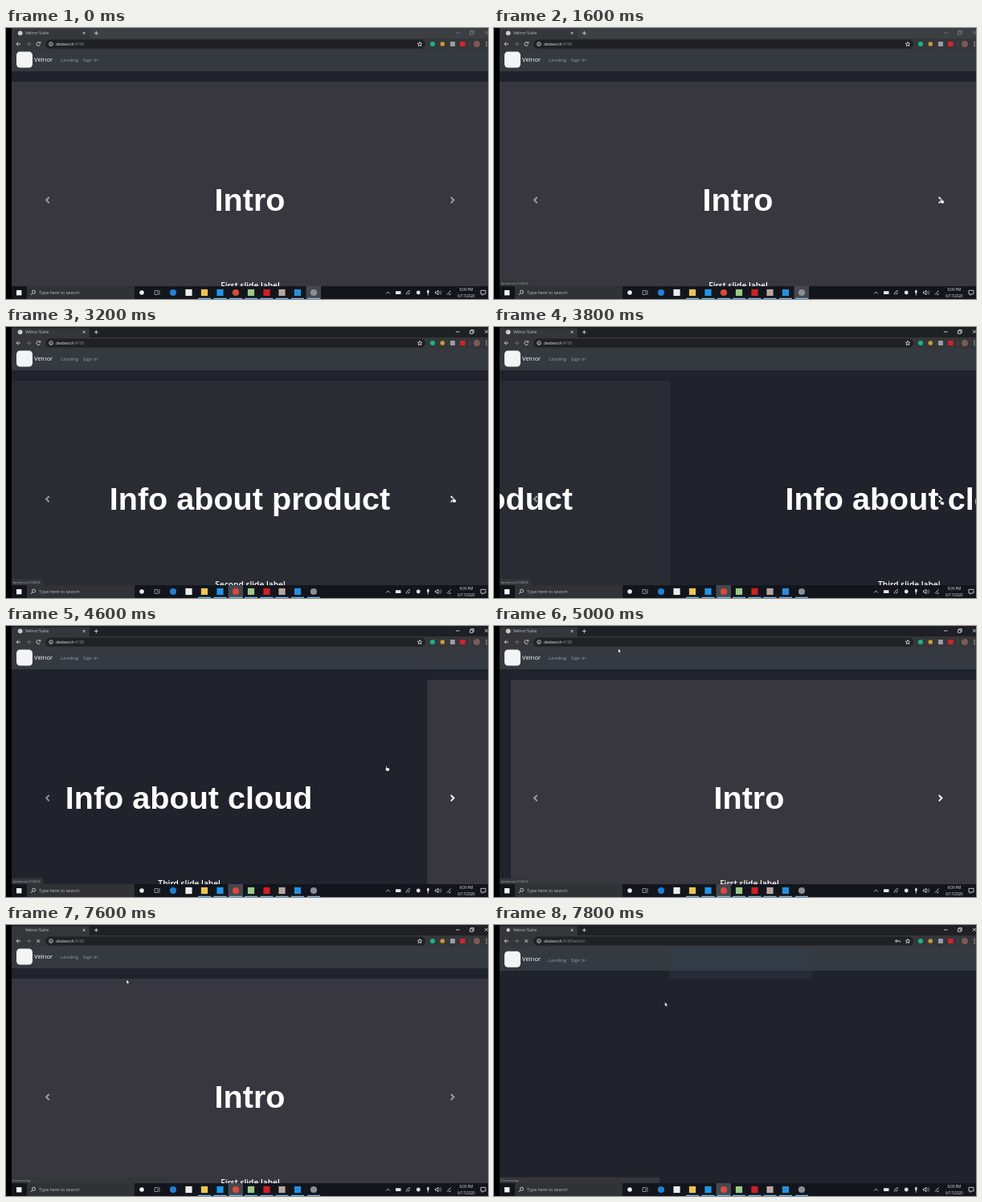
An HTML page that plays this animation: 600x338 px, repeating every 8000 ms.

```html
<!DOCTYPE html>
<html lang="en">
<head>
<meta charset="utf-8">
<title>Carousel demo</title>
<style>
  html, body { margin: 0; width: 100%; height: 100%; overflow: hidden; background: #000; }
  svg { display: block; width: 100vw; height: 100vh; font-family: "Open Sans", "Noto Sans", sans-serif; }
  .line { fill: none; stroke: #d4d5d7; stroke-width: .9; }
  .big { font: bold 39.6px "Liberation Sans", Arial, sans-serif; fill: #fff; text-anchor: middle; }
  .label { font-size: 10.2px; font-weight: 600; fill: #fff; text-anchor: middle; }
  .chev { fill: none; stroke: #fff; stroke-width: 2; }
</style>
</head>
<body>
<svg viewBox="0 0 600 338" preserveAspectRatio="none">
  <defs>
    <clipPath id="view"><rect x="7" y="67" width="593" height="255"/></clipPath>
  </defs>
  <rect width="600" height="338" fill="#000"/>
  <rect x="7" width="593" height="322" fill="#20232b"/>

  <!-- tab strip -->
  <rect id="strip" x="7" width="593" height="13"/>
  <path d="M7 13V1.5H102q2 0 2 2V13z" fill="#35363a"/>
  <circle id="favicon" cx="17.7" cy="6.3" r="2.9" fill="#c9cbce"/>
  <text x="24" y="8.2" font-size="5.2" fill="#c6c8cb">Velnor Suite</text>
  <path class="line" d="M95.7 4.9l3 3m0-3l-3 3M109.8 6.4h5M112.3 3.9v5"/>
  <path id="controls" class="line" d="M560 6h4.5M577.5 4.8h3.5v3.5h-3.5zM578.7 4.6v-1h3.6v3.6h-1M596 3.8l4 4m0-4l-4 4"/>

  <!-- toolbar -->
  <rect x="7" y="13" width="593" height="14" fill="#35363a"/>
  <rect x="49" y="14.6" width="473" height="11" rx="5.5" fill="#202124"/>
  <path class="line" d="M18 20h-5m2.4-2.4L13 20l2.4 2.4"/>
  <path class="line" opacity=".4" d="M25.5 20h5m-2.4-2.4l2.4 2.4-2.4 2.4"/>
  <path id="reload" class="line" d="M42.4 18.7a2.4 2.4 0 1 0 .2 2.1M42.7 17v2h-2"/>
  <path id="stop" class="line" d="M38.3 18l4 4m0-4l-4 4"/>
  <circle class="line" cx="56" cy="20" r="2.3" stroke-width=".6"/>
  <path class="line" d="M56 19.6v1.7"/>
  <text x="62" y="21.9" font-size="5" fill="#e2e4e6">devbench<tspan fill="#8f9398">:4100<tspan id="path"></tspan></tspan></text>
  <g id="key" class="line"><circle cx="501" cy="20" r="1.3"/><path d="M502.3 20h3.2v1.4"/></g>
  <path class="line" stroke-width=".7" d="M515 17.3l.8 1.8 2 .2-1.5 1.3.5 2-1.8-1.1-1.8 1.1.5-2-1.5-1.3 2-.2z"/>
  <circle cx="531" cy="20" r="3" fill="#18b487"/>
  <circle cx="543.3" cy="20" r="2.8" fill="#c99a34"/>
  <rect x="553" y="17" width="6" height="6" rx="1" fill="#9b9da1"/>
  <rect x="565.2" y="17" width="6.4" height="6" rx="1" fill="#d5222a"/>
  <path d="M577.5 16v8" stroke="#55575b" stroke-width=".6"/>
  <circle cx="586" cy="20" r="4" fill="#795b53"/>
  <path d="M598 16.9v1.3m0 1.2v1.3m0 1.2v1.3" stroke="#d4d5d7" stroke-width="1.2"/>

  <!-- page header -->
  <rect id="bar" x="7" y="27" width="593" height="27" fill="#343a40"/>
  <g id="nav">
    <rect x="13" y="29.5" width="20" height="20" rx="4.5" fill="#f3f4f5"/>
    <text x="35" y="42" font-size="7.7" fill="#fff">Velnor</text>
    <g font-size="6" fill="#9a9da0">
      <text x="68" y="42.4">Landing</text>
      <text id="signin" x="96" y="42.4">Sign In</text>
    </g>
  </g>
  <rect id="bubble" x="219" y="27" width="176" height="40" rx="1" fill="#304052" opacity=".32"/>

  <!-- carousel -->
  <g id="carousel" clip-path="url(#view)">
    <g id="slides"></g>
    <path class="chev" opacity=".5" d="M53.7 211l-3.6 3.6 3.6 3.6"/>
    <path id="next" class="chev" d="M553.8 211l3.6 3.6-3.6 3.6"/>
  </g>

  <g id="status">
    <path id="statusBox" fill="#35363a"/>
    <text id="statusText" x="8.5" y="320" font-size="4.2" fill="#a4a6aa"></text>
  </g>

  <!-- taskbar -->
  <rect x="7" y="322" width="593" height="16" fill="#12161c"/>
  <rect x="26" y="322" width="134" height="16" fill="#303236"/>
  <rect x="13" y="327" width="6.4" height="6.4" fill="#f2f3f4"/>
  <circle class="line" cx="34.5" cy="329.2" r="2"/>
  <path class="line" d="M33 330.7l-2.2 2.4"/>
  <text x="41" y="332.2" font-size="5.55" fill="#b9bbbe">Type here to search</text>
  <rect id="active" y="322" width="18.5" height="16" fill="#44484e"/>
  <g id="apps"></g>
  <path class="line" opacity=".7" d="M185 327.5h4v5h-4zM191 327v6"/>

  <!-- tray -->
  <path class="line" d="M473.2 331.4l2.3-2.3 2.3 2.3M498.5 332.5q0-4 4.5-5M500.5 332.5q.3-2 2.5-2.5M549 332.5l4.5-5M551 332.7q2 0 3-1.5M534.5 329h1.5l2-1.8v5.6l-2-1.8h-1.5z"/>
  <path class="line" opacity=".5" d="M539.5 328.2q1.5 1.8 0 3.6M541 327.2q2 2.8 0 5.6"/>
  <rect x="485" y="328.2" width="6.5" height="3.8" fill="#e4e5e7"/>
  <circle cx="513.3" cy="330" r="2.4" fill="#e4e5e7"/>
  <rect x="524.2" y="326.8" width="2.4" height="4.2" rx="1.2" fill="#e4e5e7"/>
  <path class="line" d="M525.4 331v2.6"/>
  <g font-size="4.5" fill="#e6e7e9" text-anchor="middle">
    <text x="573" y="328.3">9:09 PM</text>
    <text x="573" y="335.6">6/17/2020</text>
  </g>
  <path class="line" d="M591 327.3h6v4.6h-2.5l-1.3 1.5v-1.5H591z"/>

  <path id="pointer" fill="#fff" stroke="#111" stroke-width=".5"/>
</svg>
<script>
const $ = id => document.getElementById(id);
const LOOP = 8000, STEP = 200, WIDTH = 593, HOST = 'devbench:4100';
const NS = 'http://www.w3.org/2000/svg';

function add(parent, tag, attrs, text = '') {
  const el = document.createElementNS(NS, tag);
  for (const k in attrs) el.setAttribute(k, attrs[k]);
  el.textContent = text;
  return parent.appendChild(el);
}

const show = (id, on) => { $(id).style.display = on ? '' : 'none'; };

const slides = [
  ['Intro', 'First', '#38373f'],
  ['Info about product', 'Second', '#2a2c34'],
  ['Info about cloud', 'Third', '#20232b']
].map(([title, nth, fill]) => {
  const g = add($('slides'), 'g', {});
  add(g, 'rect', { x: 7, y: 67, width: WIDTH, height: 255, fill });
  add(g, 'text', { x: 303.5, y: 228.4, class: 'big' }, title);
  add(g, 'text', { x: 304, y: 325, class: 'label' }, nth + ' slide label');
  return g;
});

// x, colour, round, running
[
  [169, '#eceded', 1, 0], [208, '#1f7fd6', 1, 0], [227.5, '#eeeeee', 0, 0],
  [247, '#f0c552', 0, 1], [266.5, '#2196e8', 0, 1], [286, '#dc4a3c', 1, 1],
  [305, '#9cc987', 0, 1], [324.5, '#cf1f25', 0, 1], [343.5, '#b9a6a0', 0, 1],
  [363, '#2a8fdb', 0, 1], [383, '#8a8d92', 1, 1]
].forEach(([x, fill, round, running]) => {
  const r = x === 169 ? 2.8 : 4.1;
  if (round) add($('apps'), 'circle', { cx: x, cy: 330, r, fill });
  else add($('apps'), 'rect', { x: x - r, y: 330 - r, width: 2 * r, height: 2 * r, fill });
  if (running) add($('apps'), 'rect', { x: x - 8, y: 336.8, width: 16, height: 1.2, fill: '#76b9ed' });
});

// start, duration, from, to
const turns = [[2233, 600, 0, 1], [3450, 600, 1, 2], [4445, 623, 2, 0]];

// time, x, y, hand
const moves = [
  [600, 586, 18, 0], [800, 580, 60, 0], [1000, 570, 130, 0], [1200, 560, 190, 0],
  [1400, 556, 212, 1], [3600, 556, 215, 1], [4600, 473, 174, 1], [4800, 325, 100, 0],
  [5000, 154.5, 28, 0], [5200, 126, 20, 0], [5400, 106, 32, 0], [5600, 100.5, 39, 1],
  [7600, 150, 68, 0], [7800, 212.5, 96, 0]
];

// time, text, right edge
const notes = [
  [1400, HOST + '/#', 46], [5200, '', 0], [5600, HOST + '/enroll', 54],
  [5800, HOST + '/enroll', 206], [6600, 'Connecting...', 206]
];

const ARROW = 'M0 0v5.6l1.3-1.1.9 1.8.9-.4-.8-1.8h1.7z';
const HAND = 'M.2 0q.8-.2.9.6v2.1l2.6.6q.8.3.7 1.2l-.5 2.5H.9L-1 4.6q0-.8.9-.5z';

const latest = (rows, t) => rows.filter(r => r[0] <= t).pop();

// cubic-bezier(.42, 0, .58, 1)
function easeInOut(x) {
  let lo = 0, hi = 1, s = .5;
  for (let i = 0; i < 24; i++) {
    s = (lo + hi) / 2;
    const bx = 1.26 * s * (1 - s) ** 2 + 1.74 * s * s * (1 - s) + s ** 3;
    if (bx < x) lo = s; else hi = s;
  }
  return s * s * (3 - 2 * s);
}

function drawSlides(t) {
  const turn = latest(turns, t);
  const [start, dur, from, to] = turn || [0, 1, 0, 0];
  const raw = turn ? Math.min(1, (t - start) / dur) : 1;
  const p = raw < 1 ? easeInOut(raw) : 1;
  slides.forEach((g, i) => {
    const x = i === to ? (1 - p) * WIDTH : -p * WIDTH;
    g.style.display = i === to || (i === from && p < 1) ? '' : 'none';
    g.setAttribute('transform', `translate(${x} 0)`);
  });
}

function drawPointer(t) {
  const m = latest(moves, t);
  show('pointer', m);
  if (!m) return;
  $('pointer').setAttribute('d', m[3] ? HAND : ARROW);
  $('pointer').setAttribute('transform', `translate(${m[1]} ${m[2]})`);
}

function drawStatus(t) {
  const [, text, right] = latest(notes, t) || [0, '', 0];
  show('status', text);
  $('statusText').textContent = text;
  $('statusBox').setAttribute('d', `M7 314.5H${right - 1}q1 0 1 1V322H7z`);
}

function draw(t) {
  const loading = t >= 6600, signIn = t >= 7800, focused = t >= 2200;
  drawSlides(t);
  drawPointer(t);
  drawStatus(t);
  show('carousel', !signIn);
  show('bubble', signIn);
  show('key', signIn);
  show('reload', !loading);
  show('stop', loading);
  show('favicon', !loading || signIn);
  $('favicon').setAttribute('r', signIn ? 2.2 : 2.9);
  $('path').textContent = signIn ? '/enroll' : '';
  $('bar').setAttribute('height', signIn ? 30 : 27);
  $('nav').setAttribute('transform', `translate(0 ${signIn ? 3.3 : 0})`);
  $('signin').setAttribute('fill', t >= 5600 && t < 7600 ? '#fff' : '#9a9da0');
  $('next').setAttribute('opacity', t >= 1400 && t < 6600 ? .95 : .5);
  $('strip').setAttribute('fill', focused ? '#1f2023' : '#3c4043');
  $('controls').setAttribute('opacity', focused ? 1 : .35);
  $('active').setAttribute('x', focused ? 276.5 : 373.5);
}

const began = performance.now();
function tick() {
  const t = (performance.now() - began) % LOOP;
  draw(Math.floor(t / STEP) * STEP);
  requestAnimationFrame(tick);
}
tick();
</script>
</body>
</html>
```
